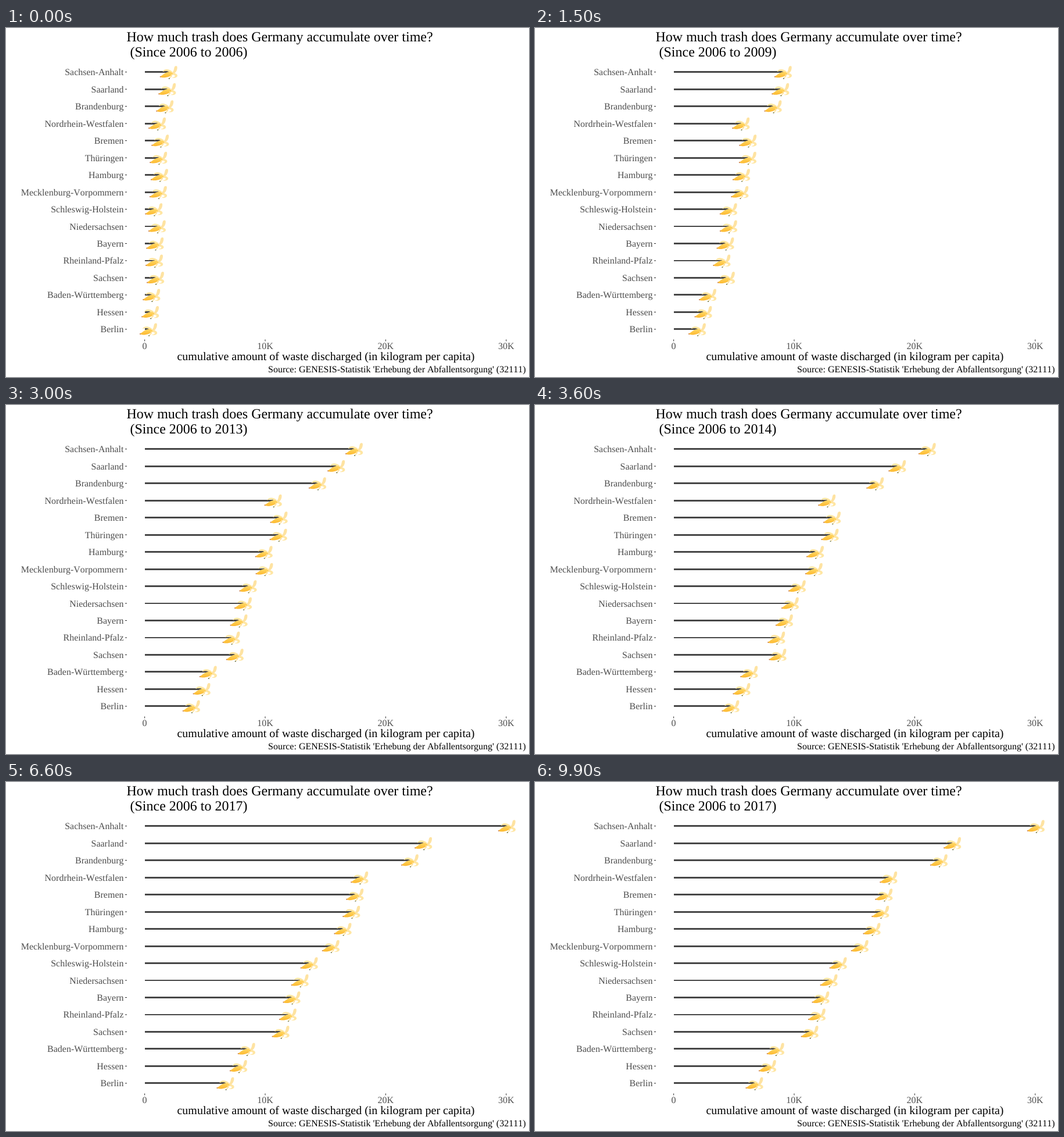
An HTML page that plays this animation: 900 px wide and 600 px high, repeating every 10 s.

```html
<!DOCTYPE html>
<html lang="en">
<head>
<meta charset="utf-8">
<title>Cumulative waste by state</title>
<style>
  html, body { margin: 0; width: 100%; height: 100%; overflow: hidden; background: #fff; }
  svg { display: block; }
  text {
    font-family: "Liberation Serif", "Times New Roman", serif;
    font-size: 16px;
    font-kerning: none;
    text-rendering: geometricPrecision;
  }
  .title { font-size: 24px; }
  .axis { font-size: 20px; }
  .label { fill: #4d4d4d; }
  .tick { stroke: #333; stroke-width: 1.07; }
  .bar { fill: #474747; shape-rendering: crispEdges; }
</style>
</head>
<body>
<svg id="chart" width="900" height="600" viewBox="0 0 900 600">
  <defs>
    <linearGradient id="skin" x1="0" y1="0" x2="0" y2="1">
      <stop offset="0" stop-color="#ffd766"/>
      <stop offset="1" stop-color="#fdb92e"/>
    </linearGradient>
    <g id="banana">
      <path d="M-11-.5C-9-5.500-1-6.500 6-.5L3 2C-1-2.500-6-2.500-11-.5Z" fill="#ffe6a0"/>
      <path d="M3 1.500C8 1 14 2.500 14.500 6C14.500 9.500 9 11 5 9.500C9 9 11 7.500 10 6C8 4.500 5 5 2 5Z" fill="#ffe6a3"/>
      <path d="M3 2C8 0 8-3 9-7.500C9.600-10.500 12.500-11.200 14-9.500C14.800-5 13 .5 7 4Z" fill="#fee3a2"/>
      <path d="M-15.500 7.500C-12 7-9 1.500-1-.2C3-.8 6 .5 6.500 3C4 7.500-6 10.500-13 9.200Z" fill="url(#skin)"/>
      <path d="M3 3C6 4 7 7 1 11L-.5 10.500C3 8 4 6 3 3Z" fill="#ffe199"/>
      <path d="M-15.700 7.200l2 .3l-.3 1.700l-1.600-.4Z" fill="#c8794a"/>
      <ellipse cx=".4" cy="11.200" rx="1.300" ry=".8" fill="#66734a"/>
    </g>
  </defs>
  <text class="title" x="207.500" y="23">How much trash does Germany accumulate over time?</text>
  <text class="title" x="213.500" y="48.500">(Since 2006 to <tspan id="year">2006</tspan>)</text>
  <text class="axis" x="550.500" y="571" text-anchor="middle">cumulative amount of waste discharged (in kilogram per capita)</text>
  <text x="894.500" y="592" text-anchor="end">Source: GENESIS-Statistik 'Erhebung der Abfallentsorgung' (32111)</text>
</svg>
<script>
const STEP_MS = 100, STEPS = 100, LAST = 49, YEARS = 11;
const ZERO_X = 239, ROW = 29.48;

// Bar ends in pixels at these steps
const KEYS = [0, 15, 24, 36, 46, 49];
const ROWS = [
  ["Sachsen-Anhalt", 280.5, 427.5, 527.7, 675.5, 815.5, 862.5],
  ["Saarland", 278, 423, 510.5, 624, 696.8, 718.8],
  ["Brandenburg", 274, 410.2, 487, 586, 670, 695.6],
  ["Nordrhein-Westfalen", 260.8, 355, 418.8, 503, 582.5, 609],
  ["Bremen", 266, 367, 428.6, 511.8, 579.6, 601],
  ["Thüringen", 263, 366.6, 430, 508.2, 574.6, 595],
  ["Hamburg", 264.7, 355.7, 408.3, 482.8, 558.6, 580.2],
  ["Mecklenburg-Vorpommern", 262.6, 353, 409.6, 480.6, 540.6, 559.5],
  ["Schleswig-Holstein", 255, 333.5, 382.6, 451.6, 505.6, 522.3],
  ["Niedersachsen", 260.6, 333.6, 378, 439.6, 490.2, 506.3],
  ["Bayern", 257, 328.2, 372.6, 429.6, 476.2, 492.2],
  ["Rheinland-Pfalz", 255.8, 322, 361.6, 416, 468.4, 485.6],
  ["Sachsen", 257.7, 329.6, 370.2, 418.2, 459.2, 473.3],
  ["Baden-Württemberg", 251, 297.7, 328, 369, 402.6, 414.5],
  ["Hessen", 248.8, 290.2, 318.8, 356.2, 390, 400.6],
  ["Berlin", 245.7, 279.7, 302.6, 337.2, 368.2, 378.2]
];

const chart = document.getElementById("chart");
const yearText = document.getElementById("year");

function add(tag, attrs, text) {
  const el = document.createElementNS("http://www.w3.org/2000/svg", tag);
  for (const key in attrs) el.setAttribute(key, attrs[key]);
  if (text) el.textContent = text;
  return chart.appendChild(el);
}

function label(x, y, anchor, text) {
  add("text", { class: "label", x, y, "text-anchor": anchor }, text);
}

function tick(x1, y1, x2, y2) {
  add("line", { class: "tick", x1, y1, x2, y2 });
}

["0", "10K", "20K", "30K"].forEach((name, i) => {
  const x = 238.6 + 207.4 * i;
  label(x, 552, "middle", name);
  tick(x, 535.5, x, 538.5);
});

const bars = ROWS.map(([name, ...ends], i) => {
  const y = 75.7 + ROW * i;
  const thin = i === 9 || i === 11;
  label(202.5, y + 5.5, "end", name);
  tick(205, y, 208, y);
  const rect = add("rect", {
    class: "bar", x: ZERO_X, y: Math.round(74.25 + ROW * i), height: thin ? 2 : 3
  });
  return { ends, y, rect };
});
bars.forEach(bar => { bar.fruit = add("use", { href: "#banana" }); });

// Smooth curve through the key values
function endAt(ends, step) {
  let i = 0;
  while (i < KEYS.length - 2 && step > KEYS[i + 1]) i++;
  const slope = (a, b) => (ends[b] - ends[a]) / (KEYS[b] - KEYS[a]);
  const tangent = k => slope(Math.max(k - 1, 0), Math.min(k + 1, KEYS.length - 1));
  const span = KEYS[i + 1] - KEYS[i];
  const u = (step - KEYS[i]) / span, v = 1 - u;
  return v * v * (1 + 2 * u) * ends[i] + u * u * (3 - 2 * u) * ends[i + 1]
    + span * u * v * (v * tangent(i) - u * tangent(i + 1));
}

function draw() {
  const step = Math.min(Math.floor(performance.now() / STEP_MS) % STEPS, LAST);
  yearText.textContent = 2006 + Math.round(YEARS * step / LAST);
  for (const { ends, y, rect, fruit } of bars) {
    const x = endAt(ends, step);
    rect.setAttribute("width", Math.round(x - ZERO_X));
    fruit.setAttribute("transform", `translate(${x.toFixed(2)} ${y.toFixed(2)})`);
  }
  requestAnimationFrame(draw);
}
draw();
</script>
</body>
</html>
```
